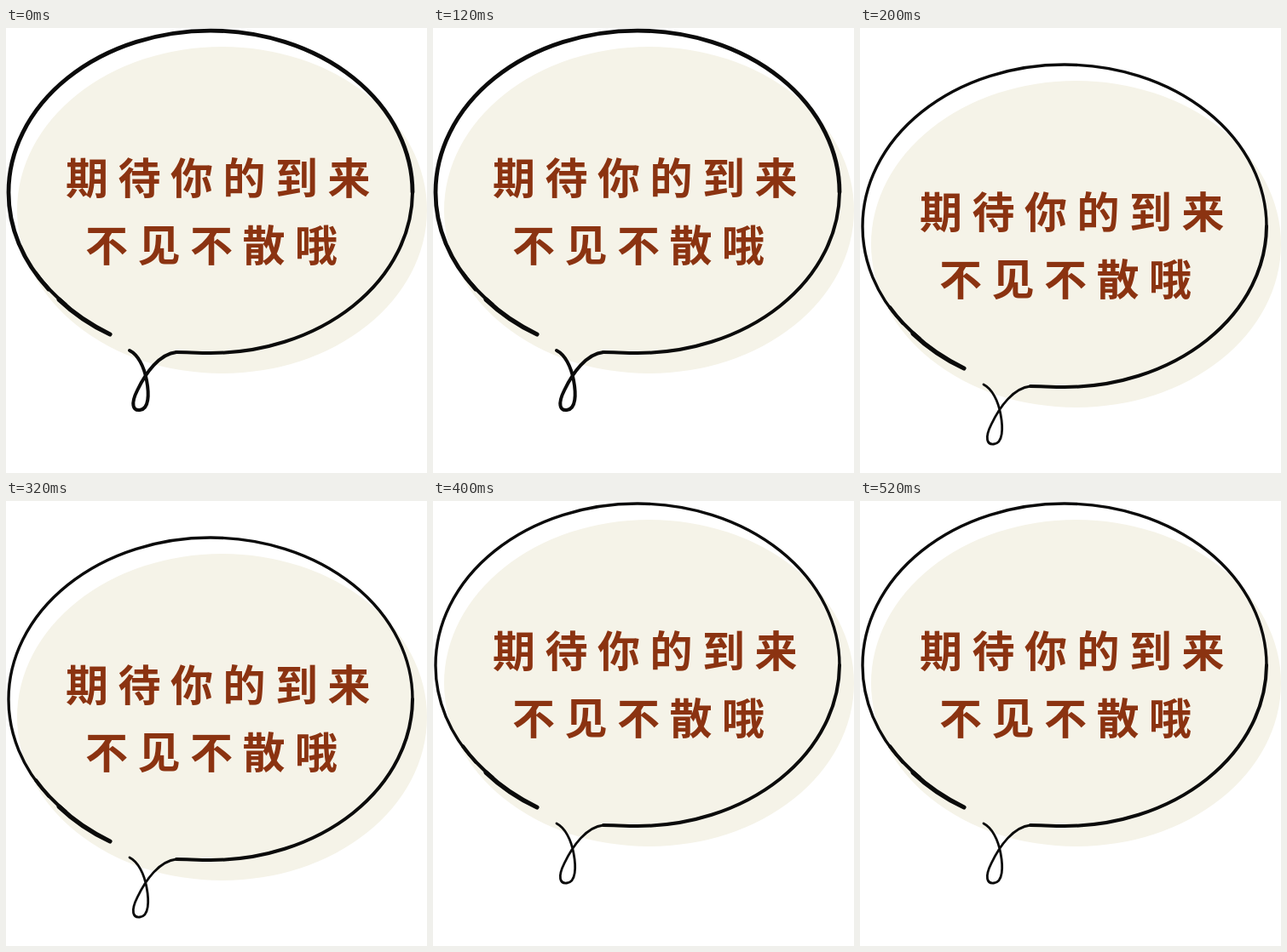
An HTML page for the animation above (0.6 s loop, 494 by 523 pixels).

```html
<!DOCTYPE html>
<html lang="zh-CN">
<head>
<meta charset="utf-8">
<style>
  html, body { margin: 0; width: 100%; height: 100%; overflow: hidden; background: #fff; }
  svg { display: block; width: 494px; height: 523px; }
  .ink { fill: none; stroke: #0b0b0b; stroke-linecap: round; stroke-linejoin: round; }
  text { font: 700 50px "Noto Sans CJK SC", "Noto Sans CJK", sans-serif; letter-spacing: 11.5px; fill: #8b3311; }
</style>
</head>
<body>
<svg viewBox="0 0 494 523">
  <g id="bubble">
    <ellipse cx="253.5" cy="214" rx="240.5" ry="192" fill="#f5f3e8"/>
    <g class="ink">
      <path id="top" d="M50 307A237 190 0 0 1 3 193A237 190 0 0 1 477 193"/>
      <path d="M477 193A237 190 0 0 1 240 382C225 382 212 381 200 381" stroke-width="4"/>
      <path d="M35 288A237 190 0 0 0 70 325" stroke-width="4"/>
      <path d="M62 319A237 190 0 0 0 122 360" stroke-width="5.2"/>
      <path id="tail" d="M200 381C180 383 164 405 154 426C146 442 149 450 157 449C168 448 168 430 165 414C162 398 155 384 145 379"/>
    </g>
    <text x="70" y="195">期待你的到来</text>
    <text x="93" y="274">不见不散哦</text>
  </g>
</svg>
<script>
  const [bubble, top_, tail] = ["bubble", "top", "tail"].map(id => document.getElementById(id));
  // Each pose: vertical offset, outline weight, tail weight
  const poses = [[0, 4.8, 4], [40, 3.4, 2.8], [0, 3.4, 2.8]];

  function draw(now) {
    const [y, outline, loop] = poses[Math.floor(now / 200) % poses.length];
    bubble.setAttribute("transform", `translate(0 ${y})`);
    top_.setAttribute("stroke-width", outline);
    tail.setAttribute("stroke-width", loop);
  }

  const start = performance.now();
  function tick() {
    draw(performance.now() - start);
    requestAnimationFrame(tick);
  }
  tick();
</script>
</body>
</html>
```
